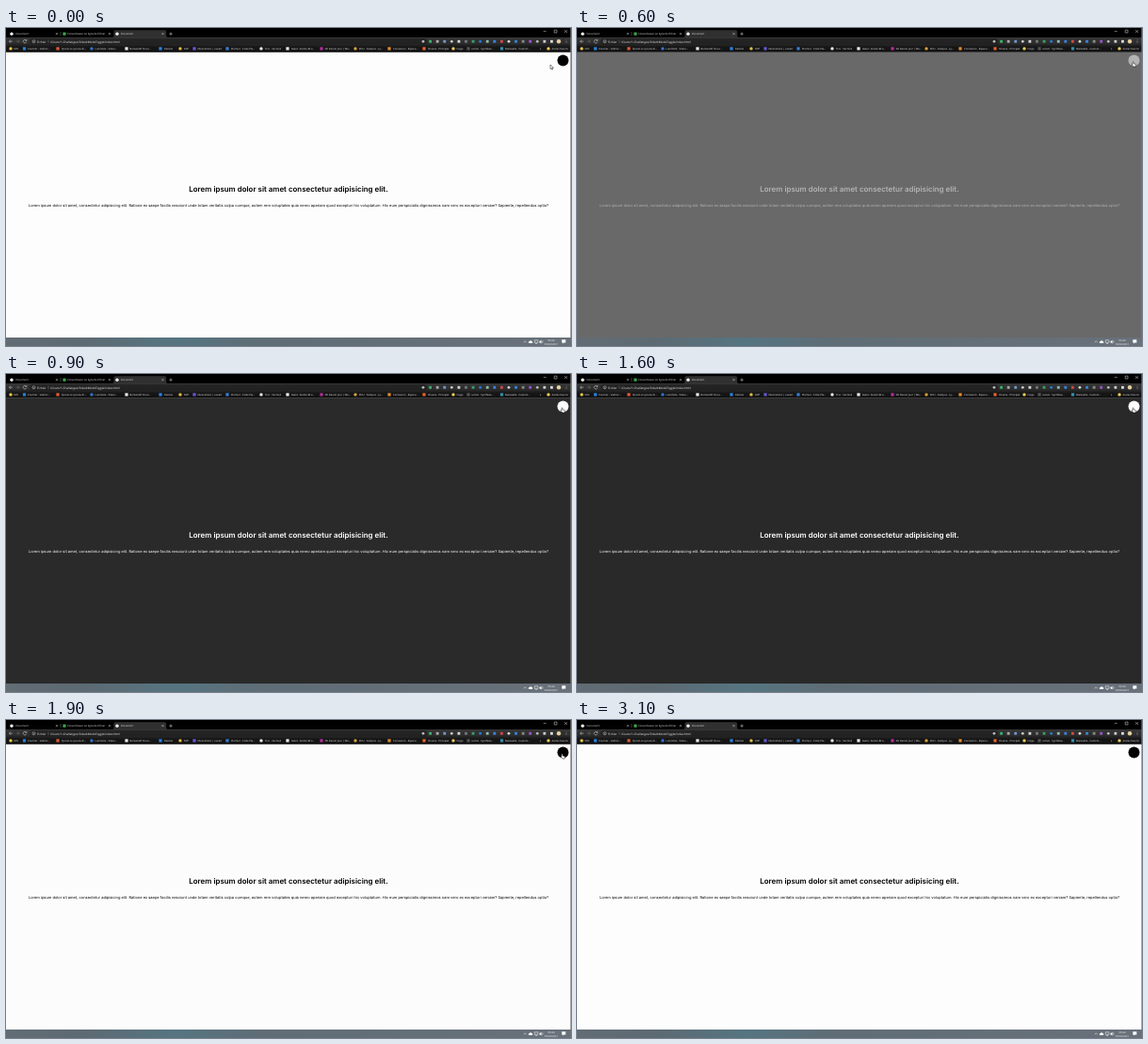
An HTML page that plays this animation: 600 by 338 pixels, repeating every 3.2 s.

```html
<!DOCTYPE html>
<html lang="fr">
<head>
<meta charset="utf-8">
<title>Document</title>
<style>
@property --dark { syntax: "<percentage>"; inherits: true; initial-value: 0%; }
html, body { margin: 0; width: 100%; height: 100%; overflow: hidden; background: #000; }
svg { display: block; width: 100vw; height: 100vh; }
text { font-family: "Open Sans", "Noto Sans", sans-serif; font-size: 2.7px; fill: #f4f4f4; text-rendering: geometricPrecision; }

.page { animation: theme 3.2s step-end infinite; }
.sheet { fill: color-mix(in srgb, #292929 var(--dark), #fdfdfd); }
.ink, .page text { fill: color-mix(in srgb, #fff var(--dark), #000); }
.page text { font-family: Inter, "Open Sans", sans-serif; text-anchor: middle; }
.page .title { font-size: 7.93px; font-weight: 600; }
.page .body { font-size: 4px; }

.line { fill: none; stroke: #ddd; stroke-width: .5; }
.faint { stroke: #777; }
.white { stroke: #fff; }
.url { font-size: 3.1px; }
.clock { text-anchor: middle; fill: #fff; }
.pointer { fill: #fff; stroke: #111; stroke-width: .5; stroke-linejoin: round; }
.arrow { animation: travel 3.2s infinite, arrow 3.2s step-end infinite; }
.hand { animation: hand 3.2s step-end infinite; }

/* one step every 100 ms = 3.125 % */
@keyframes theme {
  0% { --dark: 0%; }
  15.625% { --dark: 25%; }
  18.75% { --dark: 70%; }
  21.875% { --dark: 94%; }
  25% { --dark: 98.5%; }
  28.125% { --dark: 99.5%; }
  31.25% { --dark: 100%; }
  53.125% { --dark: 86%; }
  56.25% { --dark: 29%; }
  59.375% { --dark: .5%; }
  62.5%, 100% { --dark: 0%; }
}
@keyframes travel {
  0% { transform: translate(578px, 39px); animation-timing-function: steps(3); }
  9.375%, 65.625% { transform: translate(590px, 36px); animation-timing-function: steps(6); }
  84.375%, 100% { transform: translate(166px, 324px); }
}
@keyframes arrow {
  0%, 68.75% { opacity: 1; }
  9.375%, 87.5%, 100% { opacity: 0; }
}
@keyframes hand {
  0%, 68.75%, 100% { opacity: 0; }
  9.375% { opacity: 1; }
}
</style>
</head>
<body>
<svg viewBox="0 0 600 338" preserveAspectRatio="none">
  <defs>
    <linearGradient id="bar">
      <stop offset="0" stop-color="#626c74"/>
      <stop offset=".14" stop-color="#5d6a73"/>
      <stop offset=".3" stop-color="#557581"/>
      <stop offset=".45" stop-color="#5f6d76"/>
      <stop offset="1" stop-color="#69717a"/>
    </linearGradient>
    <linearGradient id="tools" x2="0" y2="1">
      <stop offset="0" stop-color="#363636"/>
      <stop offset=".4" stop-color="#2c2c2c"/>
      <stop offset=".65" stop-color="#161616"/>
      <stop offset="1" stop-color="#101010"/>
    </linearGradient>
  </defs>

  <g class="page">
    <rect class="sheet" y="26" width="600" height="303"/>
    <circle class="ink" cx="591.5" cy="34.5" r="6"/>
    <text class="title" x="300" y="173.5">Lorem ipsum dolor sit amet consectetur adipisicing elit.</text>
    <text class="body" x="300" y="189.5">Lorem ipsum dolor sit amet, consectetur adipisicing elit. Ratione ex saepe facilis nesciunt unde totam veritatis culpa cumque, autem rem voluptates quia nemo aperiam quod excepturi hic voluptatum. Hic eum perspiciatis dignissimos nam vero ex excepturi veniam? Sapiente, repellendus optio?</text>
  </g>

  <g id="browser">
    <rect width="600" height="26"/>
    <rect y="10" width="600" height="16" fill="url(#tools)"/>
    <rect y="25" width="600" height="1" fill="#3c3c3c"/>
    <rect x="599.4" width=".6" height="329" fill="#777"/>
    <path d="M113 10q1.5 0 1.500-2V4q0-1.700 1.700-1.700h52.300q1.700 0 1.700 1.700v4q0 2 1.500 2z" fill="#303030"/>
    <rect x="25" y="11" width="422" height="6.400" rx="3.200" fill="#1c1c1c" opacity=".6"/>
    <path class="line" d="M7 14.200H3.400m1.700-1.700l-1.700 1.700 1.700 1.700M573.700 3.600h-3M582.200 2.200h2.800V5h-2.800zM593.200 2.200l2.800 2.800m0-2.800L593.200 5M173.200 6.200h3.600M175 4.400v3.600"/>
    <path class="line faint" d="M10.600 14.200h3.600m-1.700-1.700l1.700 1.700-1.700 1.700M58 4v4M45 12.500v3.400"/>
    <path class="line" d="M21.500 13.200a1.800 1.800 0 1 0 .2 1.600M21.900 12v1.500h-1.500M29.500 14.200v1"/>
    <circle class="line" cx="29.500" cy="14.300" r="1.500"/>
    <text class="url" x="33" y="15.500">Fichier</text>
    <text class="url" x="47" y="15.500">/Cours/1-Challenges/3/darkModeToggle/index.html</text>
    <text class="url" x="566.700" y="23">»</text>
  </g>

  <g>
    <rect y="329" width="600" height="9" fill="url(#bar)"/>
    <path class="line white" d="M549.800 334.300l1.500-1.500 1.500 1.500M561.300 331.800h3.600v2.600h-3.600zM562.200 335.500h1.800M569.500 332.200a2 2 0 0 1 0 2.600"/>
    <path d="M555.500 335a1.100 1.100 0 0 1 .3-2.100 1.500 1.500 0 0 1 2.700.2 1 1 0 0 1 .2 1.900zM566.500 332.800h.8l1.200-1v3.600l-1.200-1h-.8zM590.300 331.300h4v3.300h-2l-1 1v-1h-1z" fill="#fff"/>
    <text class="clock" x="579" y="332.600">00:44</text>
    <text class="clock" x="579" y="336.700">09/02/2021</text>
  </g>

  <path class="pointer arrow" d="M0 0v4.600l1.100-1 .8 1.700.8-.4-.8-1.600h1.500z"/>
  <path class="pointer hand" d="M590 36.300q.6-.7 1.100 0v1.600l2 .5q.6.2.5.8l-.4 1.900h-2.300l-1.900-2.200q.2-.7 1 0z"/>
</svg>
<script>
const browser = document.getElementById("browser");

function add(tag, attrs, words) {
  const el = document.createElementNS("http://www.w3.org/2000/svg", tag);
  for (const key in attrs) el.setAttribute(key, attrs[key]);
  if (words) el.textContent = words;
  browser.append(el);
}
const dot = (cx, cy, fill, r = 1.7) => add("circle", { cx, cy, r, fill });
const box = (x, y, fill, s = 3.2) => add("rect", { x: x - s / 2, y: y - s / 2, width: s, height: s, fill });
const label = (x, y, words) => add("text", { x, y }, words);

const tabs = [
  [dot, 6, 10.5, 54, "Document", "#eee"],
  [box, 62, 65, 110, "Convertisseur en ligne de fichier", "#3da34a"],
  [dot, 118, 122, 166.5, "Document", "#eee"]
];
for (const [icon, at, x, close, words, color] of tabs) {
  icon(at, 6.2, color);
  label(x, 7.3, words);
  add("path", { class: "line", d: `M${close - 1} 5.2l2 2m0-2l-2 2` });
}

const marks = [
  [5, 8.5, "EVS", "#f0c94a"],
  [19.5, 23, "Courrier - Valmor…", "#2581d6"],
  [55, 59, "Qu'est-ce qu'une di…", "#e25b32"],
  [91, 94.5, "Lunétoile - Vitess…", "#3775cf"],
  [128, 131.5, "Boréal API Docu…", "#eee"],
  [164, 168, "Pastelo", "#2b83e8"],
  [185, 189, "DVP", "#e5bd42"],
  [200, 203.5, "Illustrations | ouvert", "#6659d8"],
  [235, 239, "Plumier - Code Pla…", "#367ed2"],
  [271, 275, "Troc - Vermeil", "#eee"],
  [299, 303, "Galet - Atelier-Bru…", "#eee"],
  [335, 338.5, "3D Dessin Jour | We…", "#b62d9d"],
  [371, 375, "EDU - Campus - Ly…", "#d7a43b"],
  [407, 411, "Connexion - Espace…", "#e58b2d"],
  [444, 448, "Orvane - Principal", "#ea632d"],
  [475, 478.5, "Forge", "#f3cc58"],
  [491, 494, "carnet - Synthèse…", "#555"],
  [526.5, 530, "Maravelle - Custom…", "#338fae"],
  [576, 579.5, "Autres favoris", "#f3cc58"]
];
marks.forEach(([at, x, words, color], i) => {
  (i % 3 ? box : dot)(at, 21.9, color);
  label(x, 22.9, words);
});

const tools = "#bbb #39b56a #aaa #6f9bd0 #ccc #d6d6d6 #777 #34a268 #2b7de0 #8fb8b0 #3b85de #d74848 #ddd #3b85de #888 #9a56ce #bbb #ccc #ddd".split(" ");
tools.forEach((color, i) => (i % 4 ? box(443 + i * 7.58, 14.3, color, 2.8) : dot(443 + i * 7.58, 14.3, color, 1.4)));
dot(587, 14.3, "#e6cfa0", 2.2);
for (const y of [12.9, 14.3, 15.7]) dot(595, y, "#ddd", .4);
</script>
</body>
</html>
```
